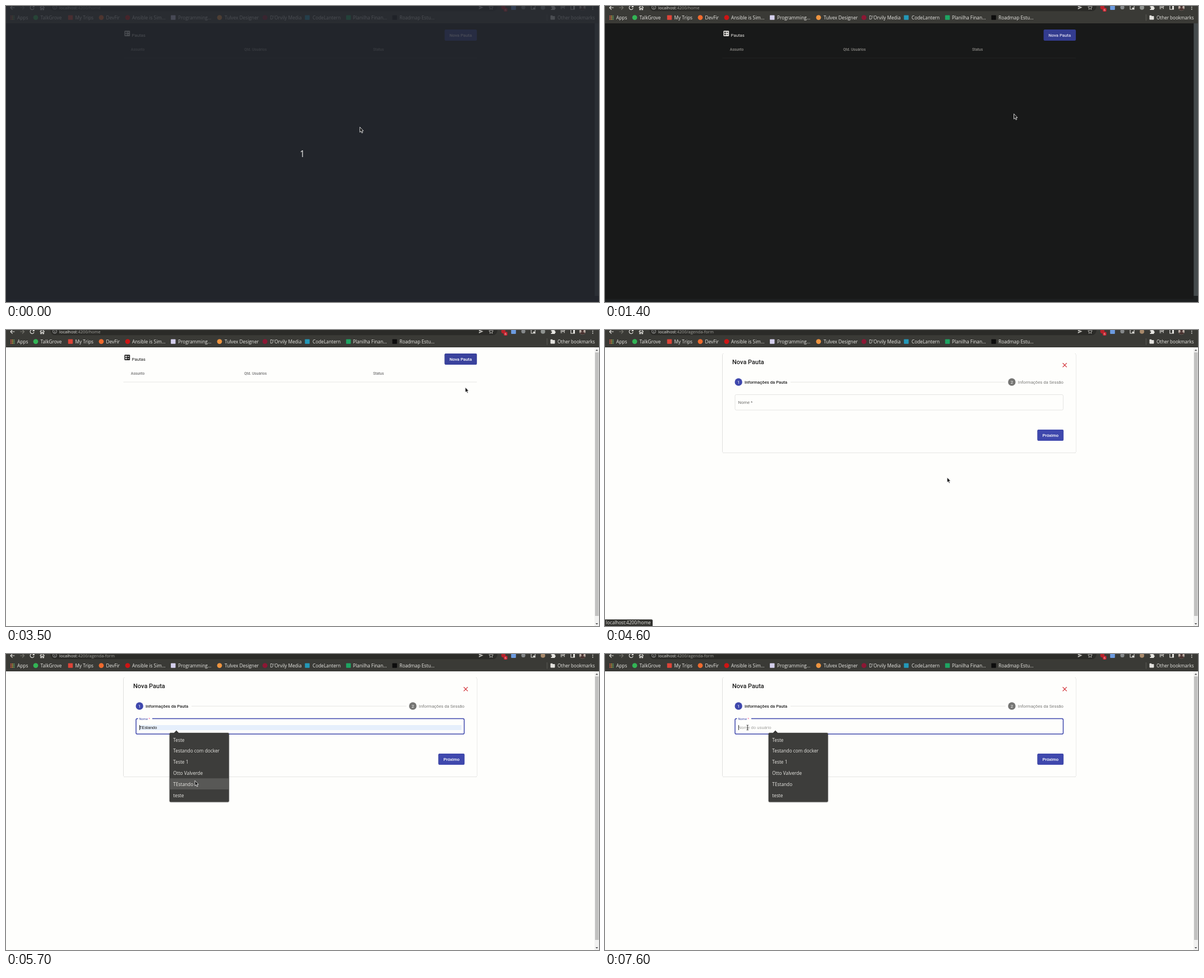
These frames come from a looping animation (1058 px wide and 529 px high, 8 s). An HTML page:

```html
<!DOCTYPE html>
<html lang="pt">
<head>
<meta charset="utf-8">
<title>Pautas</title>
<style>
html, body { margin: 0; width: 100%; height: 100%; overflow: hidden; background: #181919; }
svg { display: block; width: 100vw; height: 100vh; font-family: Roboto, sans-serif; font-size: 7.72px;
  --page: #fefefc; --ink: #1c1c1c; --head: #757575; --line: #e0e0de; --btn: #3f48ad; --btnText: #fff;
  --track: #f1f1f0; --thumb: #c1c1c0; --face: #a98a6c; }
svg.dull { --btn: #3a429d; --face: #8f9390; }
svg.dark { --page: #181919; --ink: #e4e2de; --head: #8c8a86; --line: #252728; --btn: #333c8f; --btnText: #dedcf0;
  --track: #1d2021; --thumb: #454b4d; --face: #8f9390; }
.ui { font-family: "Open Sans", "Noto Sans", sans-serif; font-size: 8.3px; fill: #e9e8e4; }
.med { font-weight: 500; }
.mid { text-anchor: middle; }
.head { font-size: 6.62px; font-weight: 500; fill: var(--head); }
.line { stroke: var(--line); stroke-width: .8; fill: none; }
.icon { stroke: #e9e8e4; fill: none; stroke-width: 1.1; }
.btn { fill: var(--btn); filter: drop-shadow(0 .8px .7px rgba(0,0,0,.4)); }
.btnText { fill: var(--btnText); font-weight: 500; text-anchor: middle; }
.card { fill: #fefefc; filter: drop-shadow(0 .9px .5px rgba(0,0,0,.5)); }
</style>
</head>
<body>
<svg id="stage" viewBox="0 0 1058 529" preserveAspectRatio="none">
  <rect width="1058" height="529" fill="var(--page)"/>

  <g id="home">
    <rect x="211.4" y="44.2" width="9.8" height="9.8" rx="1.1" fill="var(--ink)"/>
    <path d="M213 46h2.4v2.4H213zM213 49.8h2.4v2.4H213zM216.6 46.6h3.2v1.1h-3.2zM216.6 50.4h3.2v1.1h-3.2z" fill="var(--page)"/>
    <text x="224.5" y="55.4" font-size="7.85" fill="var(--ink)">Pautas</text>
    <rect class="btn" x="782.5" y="42" width="57.6" height="20" rx="2.2"/>
    <text class="btnText" x="811.2" y="54.9">Nova Pauta</text>
    <g class="head">
      <text x="222.8" y="80">Assunto</text>
      <text x="425" y="80">Qtd. Usuários</text>
      <text x="655" y="80">Status</text>
    </g>
    <path class="line" d="M209.5 93H840"/>
  </g>

  <g id="form">
    <rect class="card" x="209.6" y="42" width="630.6" height="177.8" rx="2.2"/>
    <text class="med" x="227" y="60.6" font-size="11.02" fill="#1c1c1c">Nova Pauta</text>
    <path d="M816.6 59.2l7.2 7.2m0-7.2l-7.2 7.2" stroke="#d0292f" stroke-width="1.2"/>
    <path class="line" d="M331 93.2H714.5"/>
    <circle cx="238.2" cy="93" r="6.7" fill="#3f48ad"/>
    <circle cx="725.8" cy="93" r="6.7" fill="#757573"/>
    <g class="mid" fill="#fff"><text x="238.2" y="95.8">1</text><text x="725.8" y="95.8">2</text></g>
    <text class="med" x="249" y="95.8" fill="#222">Informações da Pauta</text>
    <text x="736.8" y="95.8" fill="#7a7a78">Informações da Sessão</text>
    <rect id="box" x="232" y="115.5" width="585.5" height="27.6" rx="2.4" fill="none"/>
    <rect id="gap" x="235.6" y="114" width="25.4" height="3" fill="#fefefc"/>
    <text id="label">Nome <tspan id="star">*</tspan></text>
    <rect id="fill" x="237.5" y="127" width="575.3" height="9.2" fill="#e6effc"/>
    <text id="hint" x="237.8" y="134" fill="#a2a2a0">Nome do usuário</text>
    <text id="value" x="237.8" y="134" style="font:7.35px 'Liberation Sans',Arial,sans-serif" fill="#111"></text>
    <rect id="caret" x="238" y="127" width=".9" height="9" fill="#222"/>
    <rect class="btn" x="771.4" y="178" width="46.7" height="20" rx="2.2"/>
    <text class="btnText" x="794.8" y="190.7">Próximo</text>
  </g>

  <g id="menu">
    <path d="M299.3 141.4l4.7-4.8 4.7 4.8z" fill="#3d3d3b"/>
    <rect x="291.8" y="141" width="106" height="123.6" rx="1.8" fill="#3d3d3b" style="filter:drop-shadow(0 .6px .8px rgba(0,0,0,.45))"/>
    <rect id="hover" x="291.8" width="106" height="19.8" fill="#585856"/>
    <g id="items" class="ui"></g>
  </g>

  <g id="status">
    <path d="M0 517.2H83q2 0 2 2V529H0z" fill="#31312e"/>
    <text class="ui" x="1.8" y="526.2" style="font-size:8.15px">localhost:4200/home</text>
  </g>

  <rect x="1050" y="31" width="8" height="498" fill="var(--track)"/>
  <g id="lightBar">
    <rect x="1051" y="40" width="6.5" height="471" fill="var(--thumb)"/>
    <path d="M1051.8 37.2h4.6l-2.3-2.5zM1051.8 524h4.6l-2.3 2.5z" fill="#505050"/>
  </g>
  <g id="darkBar">
    <rect x="1050.4" y="31" width="7.6" height="487" fill="var(--thumb)"/>
    <rect y="523.5" width="1058" height="5.5" fill="var(--track)"/>
  </g>

  <g id="chrome">
    <rect width="1058" height="31" fill="#3a3a36"/>
    <path d="M79 0H877Q876 9.3 868 9.3H87Q80 9.3 79 0z" fill="#2b2b28"/>
    <g class="icon">
      <path d="M15.4 3H8.2M11.6-.6L8 3l3.6 3.6"/>
      <path d="M25.2 3h7.2M29-.6L32.6 3 29 6.6" stroke="#77766f"/>
      <path d="M49.4 .8A3.5 3.5 0 1 0 50 4M50.2-1v2.6h-2.6"/>
      <path d="M60.6 3l4-3.8 4 3.8M61.8 2.4v4.2h1.7V3.9h2.2v2.7h1.7V2.4"/>
      <path d="M87 2v2.6M87 .3v.9" stroke="#bbb" stroke-width=".9"/>
      <circle cx="87" cy="2.5" r="3.5" stroke="#bbb" stroke-width=".8"/>
      <path d="M843.8-.8L851.6 2.6 843.8 6V3.4L848 2.6 843.8 1.8z" fill="#bdbcb8" stroke="none"/>
      <path d="M865.5-1.2l1.1 2.5 2.7.3-2 1.8.6 2.7-2.4-1.4-2.4 1.4.6-2.7-2-1.8 2.7-.3z" stroke="#d0cfcb" stroke-width=".8"/>
      <rect x="937" y="-.5" width="7" height="6.4" stroke-width="1"/>
      <rect x="940.6" y="2.8" width="3" height="2.6" fill="#e9e8e4" stroke="none"/>
      <path d="M972.4.4h2.2a1.3 1.3 0 1 1 2.6 0h2.2v2.2a1.3 1.3 0 1 1 0 2.6v1.8h-7V5a1.3 1.3 0 1 0 0-2.4z" fill="#e9e8e4" stroke="none"/>
      <path d="M989.4 0h5.6M989.4 2.4h5.6M989.4 4.8h3M996 5.2V0h1.6"/>
      <rect x="1007.8" y="-.6" width="6.6" height="6.6"/>
      <path d="M1013 0v6" stroke-width="2"/>
    </g>
    <g fill="#e9e8e4"><circle cx="1046.8" cy="-.2" r=".9"/><circle cx="1046.8" cy="2.8" r=".9"/><circle cx="1046.8" cy="5.8" r=".9"/></g>
    <circle cx="887.4" cy="2.4" r="3.8" fill="#b5232b"/>
    <rect x="888" y="3.6" width="6.6" height="6.4" rx="1.4" fill="#c91f2c"/>
    <text class="ui mid" x="891.3" y="9" style="font-size:6px">6</text>
    <rect x="901.2" y="-1.4" width="8.6" height="8.4" rx="1" fill="#6c9be0"/>
    <circle cx="923" cy="2.4" r="3.6" fill="#85888a"/>
    <circle cx="958" cy="2.8" r="4" fill="var(--face)"/>
    <circle cx="1028.5" cy="2.6" r="5.6" fill="#b8aaa2"/>
    <path d="M1023.6 5.6q4.8-4 9.8 0-4.6 5-9.8 0z" fill="#46302e"/>
    <circle cx="1028.5" cy="1.6" r="2.2" fill="#46302e"/>
    <text class="ui" x="95" y="5.6" style="font-size:7.52px">localhost<tspan id="path" fill="#a3a29d"></tspan></text>
    <g id="marks"></g>
    <path d="M965.3 15v11.4" stroke="#66655f" stroke-width=".8"/>
    <path d="M971.4 17.6q0-.8.8-.8h2.4l1 1.2h3q.8 0 .8.8v4.8q0 .8-.8.8h-6.4q-.8 0-.8-.8z" fill="#e3e2de"/>
    <text class="ui" x="984" y="23.6" style="font-size:8.1px">Other bookmarks</text>
  </g>

  <g id="count">
    <rect width="1058" height="529" fill="rgb(37,41,48)" opacity=".8"/>
    <text class="ui mid" x="528.6" y="270.4" style="font-size:15.5px;fill:#f0f0ee">1</text>
  </g>

  <g id="cursor">
    <path id="arrow" d="M.3.3V9.6L2.4 7.7 3.9 11 5.5 10.3 4 7.1H6.7z" fill="#151515" stroke="#fff" stroke-width=".8"/>
    <path id="hand" d="M2.6.8q1-.9 1.7.2V4.2l4 .9q1 .4.8 1.6L8.4 11H3.6L.4 7.2q-.2-1.3 1-1.1l1.2.9z" fill="#151515" stroke="#fff" stroke-width=".8"/>
    <path id="beam" d="M-1.7-4.3H-.4L0-3.9.4-4.3H1.7M0-4V4M-1.7 4.3H-.4L0 3.9.4 4.3H1.7" fill="none" stroke="#222" stroke-width=".9"/>
  </g>
</svg>
<script>
const LOOP = 8000, STEP = 100;
const $ = id => document.getElementById(id);
const show = (id, on) => $(id).style.display = on ? "" : "none";
const set = (id, attrs) => { for (const k in attrs) $(id).setAttribute(k, attrs[k]); };

// Bookmarks: icon shape, icon centre, colour, text x, text
const marks = [
  ["o", 53, "#32b455", 61.5, "TalkGrove"], ["s", 115, "#dd4438", 123.5, "My Trips"],
  ["o", 170, "#ef6a2e", 178.5, "DevFir"], ["o", 217, "#cc1414", 225, "Ansible is Sim…"],
  ["s", 298.3, "#d4cfec", 307, "Programming…"], ["o", 381, "#ee9440", 390, "Tulvex Designer"],
  ["o", 462, "#8c1734", 471, "D'Orvily Media"], ["s", 537.5, "#2398b8", 547, "CodeLantern"],
  ["s", 611, "#1da462", 619, "Planilha Finan…"], ["s", 693.5, "#0c0c0c", 702, "Roadmap Estu…"]
];
const label = (x, y, s) => `<text class="ui" x="${x}" y="${y}">${s}</text>`;
let html = label(20, 23.6, "Apps");
for (let i = 0; i < 9; i++)
  html += `<rect x="${7.9 + i % 3 * 2.8}" y="${17.2 + (i / 3 | 0) * 2.8}" width="1.8" height="1.8" fill="${["#e0564a", "#d8a33c", "#5fa86a"][i % 3]}"/>`;
for (const [shape, x, color, tx, s] of marks)
  html += (shape == "o" ? `<circle cx="${x}" cy="20.6" r="4.4" fill="${color}"/>`
    : `<rect x="${x - 4.2}" y="16.4" width="8.4" height="8.4" rx=".8" fill="${color}"/>`) + label(tx, 23.6, s);
$("marks").innerHTML = html;

const items = ["Teste", "Testando com docker", "Teste 1", "Otto Valverde", "TEstando", "teste"];
const ROW = 19.83, MENU_TOP = 143.3;
$("items").innerHTML = items.map((s, i) => label(298.3, 156.5 + i * ROW, s)).join("");

// Pointer keys: time, x, y
const keys = [
  [800, 631, 216], [1000, 646, 226], [1500, 750, 184], [1700, 750, 184], [1900, 819, 196.5],
  [2000, 819, 196.5], [2100, 826, 197], [2200, 826, 197], [2500, 819, 131], [3400, 819, 131],
  [3500, 819, 102], [3600, 819, 102], [3700, 820, 70], [3900, 820, 70], [4000, 818, 51.5],
  [4300, 818, 51.5], [4400, 695, 178], [4500, 695, 178], [4600, 610, 263], [5100, 270, 131],
  [5400, 270, 131], [5500, 305, 163], [5700, 336.7, 226], [5800, 336.7, 226], [5900, 335, 247],
  [6300, 262, 182], [6400, 262, 182], [6700, 254.3, 131.5]
];
function pointer(t) {
  const i = keys.findIndex(k => k[0] >= t);
  if (i < 0) return keys[keys.length - 1].slice(1);
  if (i == 0) return keys[0].slice(1);
  const [t0, x0, y0] = keys[i - 1], [t1, x1, y1] = keys[i], p = (t - t0) / (t1 - t0);
  return [x0 + (x1 - x0) * p, y0 + (y1 - y0) * p];
}

function draw(ms) {
  const t = Math.floor(ms / STEP) * STEP;
  const dark = t < 3500, form = t >= 4200, focus = t >= 5300, menu = t >= 5400;
  const [x, y] = pointer(t);

  $("stage").setAttribute("class", dark ? "dark" : t < 3700 ? "dull" : "");
  show("count", t < 300);
  show("home", !form);
  show("form", form);
  show("darkBar", dark);
  show("lightBar", !dark);
  show("status", t >= 4300 && t < 4800);
  $("path").textContent = ":4200/" + (form ? "agenda-form" : "home");

  const row = menu && x > 292 && x < 398 ? Math.floor((y - MENU_TOP) / ROW) : -1;
  const picked = items[row];
  show("menu", menu);
  show("hover", picked);
  if (picked) set("hover", { y: MENU_TOP - .4 + row * ROW });
  show("fill", picked);
  show("hint", focus && !picked);
  $("value").textContent = picked || "";
  show("caret", focus && !(t >= 7100 && t < 7600));

  const rise = Math.max(0, Math.min(1, (t - 5200) / 200));
  set("label", { x: 237.4, y: 131.6 - 13.6 * rise, "font-size": 7.72 - 1.93 * rise, fill: focus ? "#3f48ad" : "#6f6f6d" });
  set("star", { fill: focus ? "#ff4081" : "#6f6f6d" });
  set("box", { stroke: focus ? "#3f48ad" : "#dededc", "stroke-width": focus ? 1.5 : .8 });
  show("gap", focus);

  const hand = t >= 4000 && t < 4400;
  const beam = form && x > 232 && x < 818 && y > 115 && y < 143 && !hand;
  show("hand", hand);
  show("beam", beam);
  show("arrow", !hand && !beam);
  set("cursor", { transform: `translate(${x} ${y})` });
}

const start = performance.now();
function frame() {
  draw((performance.now() - start) % LOOP);
  requestAnimationFrame(frame);
}
frame();
</script>
</body>
</html>
```
